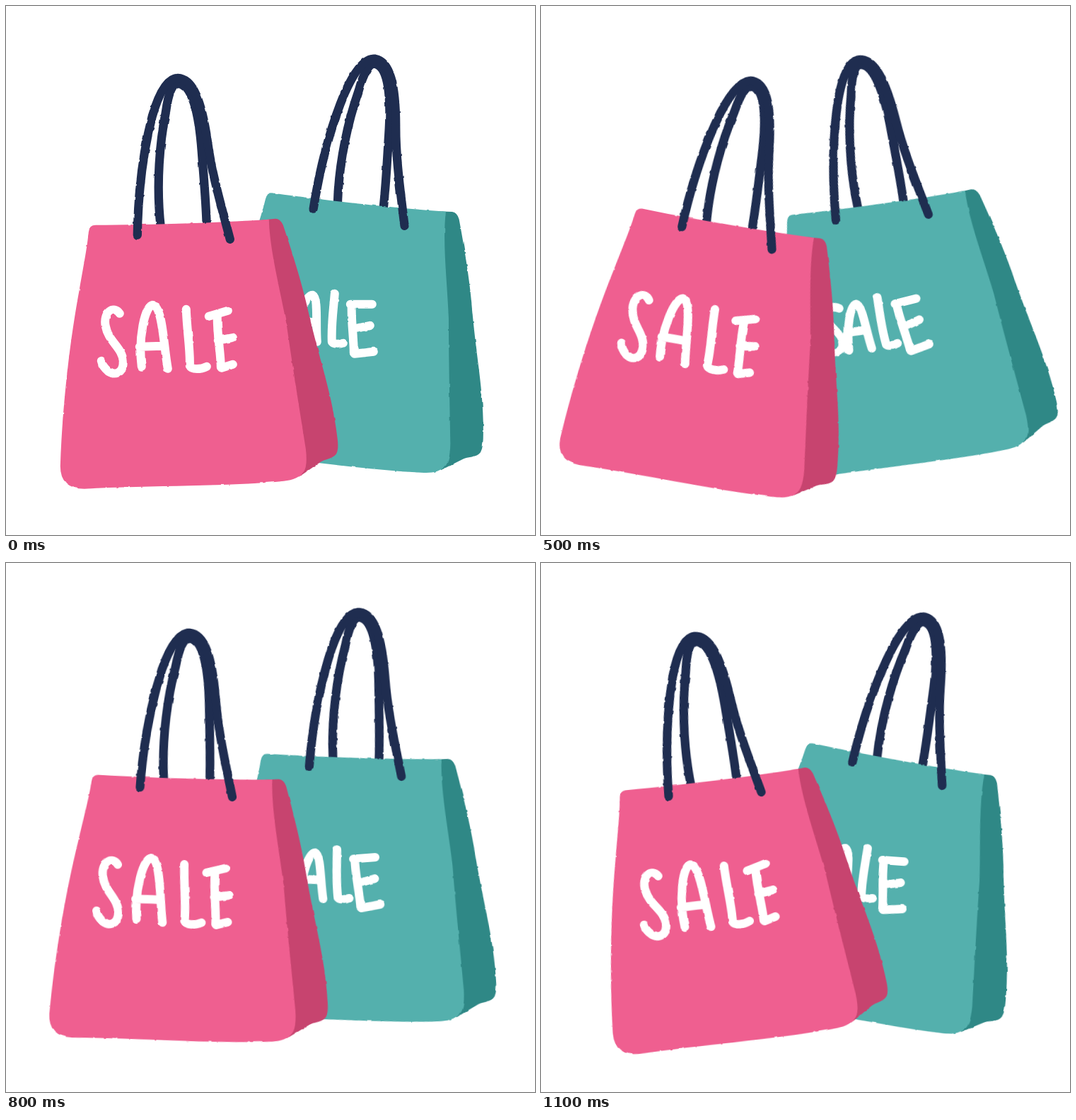
Animation, 748 px wide and 748 px high, one loop 1.2 s. Source, as an HTML page:

```html
<!DOCTYPE html>
<html lang="en">
<head>
<meta charset="utf-8">
<title>Sale bags</title>
<style>
  html, body { margin: 0; height: 100%; overflow: hidden; background: #fff; }
  svg { display: block; width: 100%; height: 100%; }
  path { fill: none; stroke-linecap: round; stroke-linejoin: round; }
  .handle { stroke: #1f2d50; stroke-width: 12.3; }
  .letters { stroke: #fff; stroke-width: 12; }
  .pink .front { fill: #ef5f90; }
  .pink .side { fill: #c7446f; }
  .green .front { fill: #54b0ad; }
  .green .side { fill: #2f8886; }
</style>
</head>
<body>
<svg viewBox="0 0 748 748" role="img" aria-label="Two swinging shopping bags that say SALE">
  <filter id="rough" color-interpolation-filters="sRGB">
    <feTurbulence type="fractalNoise" baseFrequency=".09" numOctaves="2" seed="4" result="noise"/>
    <feDisplacementMap in="SourceGraphic" in2="noise" scale="2.5" xChannelSelector="R" yChannelSelector="G"/>
    <feGaussianBlur stdDeviation=".4"/>
  </filter>
  <g id="green" class="green"></g>
  <g id="pink" class="pink"></g>
</svg>
<script>
const bag = `
  <path class="handle" d="M218 312C211 250 217 190 225 150C229 120 235 108 243 108C262 110 272 150 276 205C279 245 282 275 283 312"/>
  <path class="side" d="M360 302L380 300Q387 300 391 309C408 360 420 400 428 437C444 505 461 550 468 612Q470 629 465 634C459 640 450 640 444 644L415 664Z"/>
  <path class="front" d="M125 309C200 309 300 306 371 301C372 345 387 400 396 450C406 520 416 580 423 625Q426 650 420 658Q412 669 392 671C310 679 200 677 110 682Q76 682 76 650C79 560 90 470 103 400C110 360 114 340 116 319Q117 309 125 309Z"/>
  <path class="handle" d="M185 323C186 265 193 205 206 155C217 117 229 101 242 101C264 102 276 135 284 190C290 235 303 280 316 329"/>`;

const letters = d => `<path class="letters" d="${d}"/>`;

const pinkText = letters(`M160 434C152 422 136 432 140 452C144 474 164 482 165 502C165 520 152 521 144 516C138 511 135 507 134 501
  M191 509C186 470 195 423 207 422C221 425 222 480 228 512M188 481L220 480
  M254 428C255 460 260 485 259 508C262 514 275 513 283 509
  M298 436C297 460 303 490 303 510M286 438L313 430M299 472L320 468M304 511L320 506`);

const greenText = letters(`M408 408C395 398 382 410 388 424C394 438 404 447 400 460C396 470 380 470 374 460
  M407 469C412 435 424 407 433 408C441 412 437 450 439 474M411 444L438 447
  M464 406C462 430 459 450 460 474C463 478 470 477 476 476
  M488 421C487 445 491 468 491 490M486 421L517 421M490 456L514 451M492 491L519 488`);

// Keys: [step, angle, vertical shift]
const bags = [
  { id: "pink", pivot: "250 385", art: bag + pinkText,
    keys: [[0, 0, 0], [3, 7.3, -1.5], [5, 11.5, 0], [6, 9, -2], [8, 3.4, -3], [9, 0, -2], [11, -5.2, 0]] },
  { id: "green", pivot: "481 365",
    art: `<g transform="translate(521 445.5) rotate(8) translate(-293.5 -469)">${bag}</g>` + greenText,
    keys: [[0, 0, 0], [3, -8, .5], [5, -14.1, 2.5], [6, -10.3, -.5], [8, -4.4, -2.7], [9, -.9, -3.3], [11, 4.1, -2]] }
];

for (const b of bags) {
  b.node = document.getElementById(b.id);
  b.node.innerHTML = `<g filter="url(#rough)" transform="translate(.8 .8)">${b.art}</g>`;
}

function pose(keys, step) {
  const i = Math.max(1, keys.findIndex(k => k[0] >= step));
  const a = keys[i - 1], b = keys[i];
  const u = (step - a[0]) / (b[0] - a[0]);
  return [1, 2].map(n => a[n] + (b[n] - a[n]) * u);
}

let shown = -1;
function draw() {
  const step = Math.floor(performance.now() / 100) % 12;
  if (step !== shown) {
    shown = step;
    for (const b of bags) {
      const [angle, dy] = pose(b.keys, step);
      b.node.setAttribute("transform", `translate(0 ${dy}) rotate(${angle} ${b.pivot})`);
    }
  }
  requestAnimationFrame(draw);
}
draw();
</script>
</body>
</html>
```
